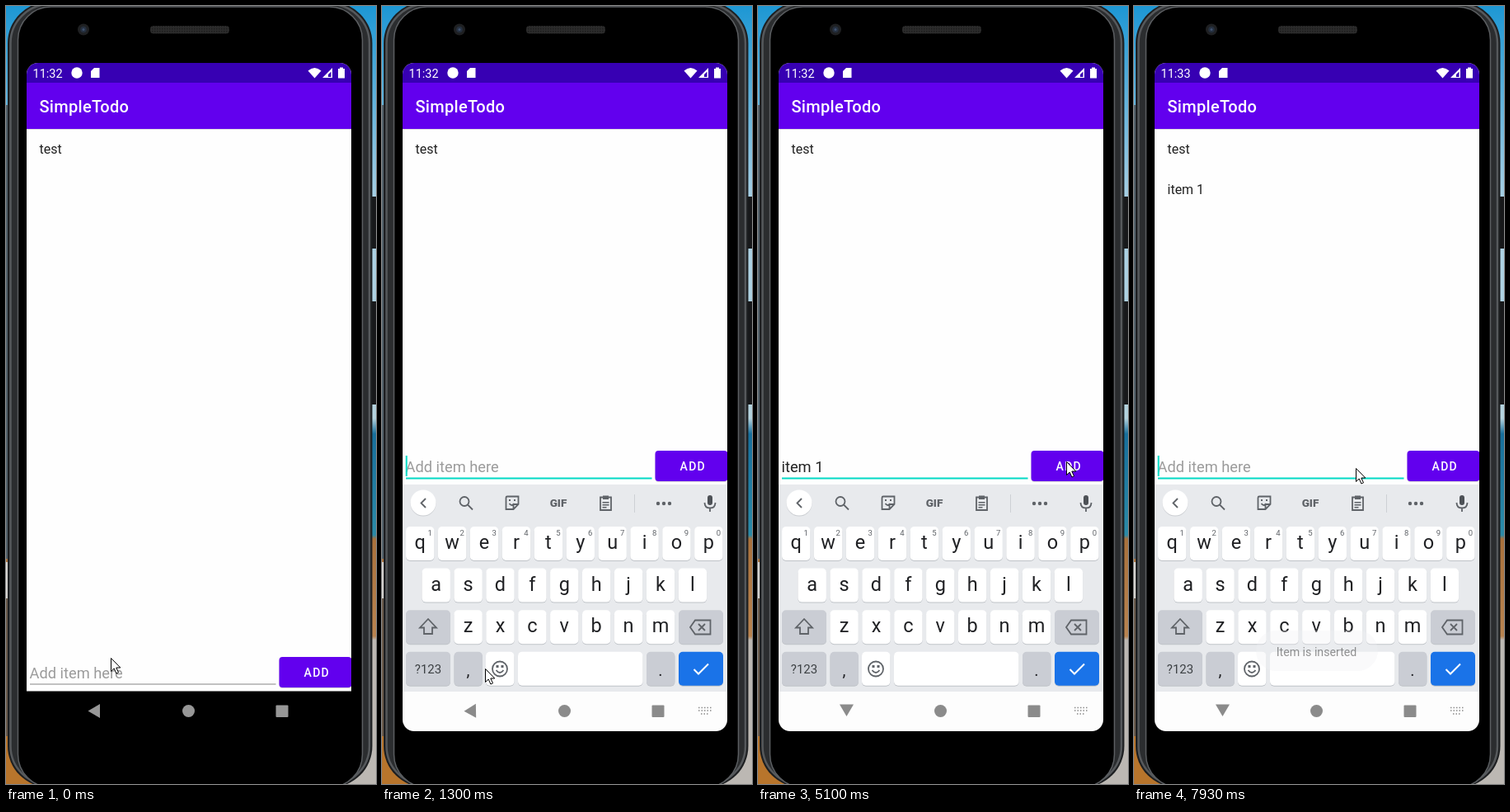
These frames come from a looping animation (449x943 px, 8 s). An HTML page:

```html
<!DOCTYPE html>
<html lang="en">
<head>
<meta charset="utf-8">
<title>Todo app demo</title>
<style>
  html, body { margin: 0; width: 100%; height: 100%; overflow: hidden; background: #000; }
  svg { display: block; width: 100%; height: 100%; font-family: Roboto, sans-serif; }
  .mid { text-anchor: middle; }
  .medium { font-weight: 500; }
  .line { fill: none; stroke: #5f6368; stroke-width: 1.8; }
</style>
</head>
<body>
<svg viewBox="0 0 449 943" preserveAspectRatio="none">
  <defs>
    <linearGradient id="sky" x2="0" y2="1">
      <stop offset="0" stop-color="#1d97d4"/>
      <stop offset=".25" stop-color="#a9d0e4"/>
      <stop offset=".53" stop-color="#b4d3de"/>
      <stop offset=".55" stop-color="#176f9c"/>
      <stop offset=".68" stop-color="#2b8ba8"/>
      <stop offset=".685" stop-color="#a9713c"/>
      <stop offset=".81" stop-color="#b98450"/>
      <stop offset=".815" stop-color="#bcb8b3"/>
    </linearGradient>
    <pattern id="mesh" width="3" height="3" patternUnits="userSpaceOnUse">
      <path d="M0 0h3v3H0z" fill="#2c2c2c"/><path d="M0 0h1.5v1.5H0z" fill="#1b1b1b"/>
    </pattern>
    <clipPath id="screen"><rect x="25" y="69" width="394" height="810" rx="14"/></clipPath>
  </defs>

  <rect width="449" height="943" fill="url(#sky)"/>
  <rect y="120" width="3" height="550" fill="#54636c"/>
  <rect y="674" width="3" height="44" fill="#d5d3d0"/>
  <rect y="718" width="3" height="170" fill="#6b5b4c"/>
  <rect y="885" width="60" height="58" fill="#b8752c"/>

  <g id="phone">
    <path d="M443 231h6v63h-6zM443 358h6v125h-6z" fill="#17181a"/>
    <rect x="2" y="-5" width="442.5" height="952" rx="50" fill="#1d1f21"/>
    <rect x="5.5" y="-2" width="435.5" height="946" rx="47" fill="#2b2d2f" stroke="#56595c" stroke-width="2.5"/>
    <rect x="14.500" y="1" width="418" height="946" rx="40" fill="#000" stroke="#5b5e61" stroke-width="1.5"/>
    <circle cx="94" cy="28.5" r="7" fill="#1f2022"/>
    <circle cx="94" cy="28.5" r="3.800" fill="#26303f"/>
    <circle cx="94" cy="28.5" r="1.5" fill="#3f5270"/>
    <rect x="175" y="24" width="96" height="9.5" rx="4" fill="url(#mesh)"/>
  </g>

  <g clip-path="url(#screen)">
    <rect x="25" y="69" width="394" height="761.5" fill="#fefefe"/>
    <rect x="25" y="149" width="394" height="1" opacity=".12"/>
    <rect x="25" y="93" width="394" height="56" fill="#6200ee"/>
    <rect x="25" y="69" width="394" height="24" fill="#3700b3"/>
    <g fill="#fff">
      <text id="clock" x="32.5" y="86.5" font-size="14.5"></text>
      <circle cx="86" cy="81" r="6.7"/>
      <path d="M107 75h6.5v12H103v-8z"/>
      <path d="M366.5 78.5q8-7 16 0l-8 9z"/>
      <path d="M396 75v12h-12zm-1.5 4.5l-3.5 3.5v3h3.5z" fill-rule="evenodd"/>
      <path d="M405 74.5h4V76h2v11.5h-8V76h2z"/>
      <text class="medium" x="40.5" y="129" font-size="20" letter-spacing=".28">SimpleTodo</text>
    </g>
    <g font-size="16" fill="#212121">
      <text x="40.5" y="179">test</text>
      <text id="item" x="40.5" y="227.5">item 1</text>
    </g>

    <g id="form">
      <g font-size="18.3">
        <text id="hint" x="28.500" y="814.5" fill="#9b9b9b">Add item here</text>
        <text id="entry" x="28.500" y="814.5" fill="#212121" xml:space="preserve"></text>
      </g>
      <rect id="compose" x="29" y="817" height="1" fill="#333"/>
      <rect id="rule" x="29" y="821.5" width="298.5"/>
      <rect id="caret" y="795" width="2" height="25" fill="#03dac5"/>
      <rect x="331.5" y="790" width="88" height="37" rx="4" opacity=".15"/>
      <rect x="331.5" y="789" width="88" height="37" rx="4" fill="#6200ee"/>
      <rect id="ripple" x="331.5" y="789" width="88" height="37" rx="4" fill="#fff"/>
      <text class="medium mid" x="377.3" y="813" font-size="14" letter-spacing="1.25" fill="#fff">ADD</text>
    </g>

    <g id="keyboard">
      <rect x="25" y="580" width="394" height="252" fill="#e8eaed"/>
      <rect x="25" y="831" width="394" height="60" fill="#fdfdfd"/>
      <circle cx="50" cy="603" r="15.5" fill="#c9ccd0"/>
      <circle cx="50" cy="602" r="15.5" fill="#fff"/>
      <path id="chevron" class="line"/>
      <g id="tools">
        <circle class="line" cx="100" cy="600.5" r="5.5"/><path class="line" d="M104 604.5l6 6"/>
        <path class="line" d="M152 594.5h13.5v9.500l-6 6H150.500v-14q0-1.500 1.500-1.500zM165.500 604h-6v6M154.500 603q3 4 6 0"/>
        <path d="M154 598h2v2h-2zM160 598h2v2h-2z" fill="#5f6368"/>
        <text class="mid" x="214" y="607" font-size="13.5" font-weight="900" fill="#5f6368">GIF</text>
        <path class="line" d="M265 595.5h13v15.500h-13z"/>
        <path d="M268 593.5h7v4.500h-7zM267.500 601h8v1.500h-8zM267.500 604h8v1.500h-8zM267.500 607h5v1.500h-5z" fill="#5f6368"/>
        <path d="M306.5 592v22" stroke="#cdd0d4"/>
        <path d="M335 603h15" stroke="#5f6368" stroke-width="4.4" stroke-linecap="round" stroke-dasharray="0 7"/>
      </g>
      <g id="words" class="mid" font-size="18.1" fill="#5f6368">
        <path d="M163.5 591v23M277.5 591v23" stroke="#cdd0d4"/>
        <text x="113" y="609.5"></text><text x="220.5" y="609.5"></text><text x="328" y="609.5"></text>
      </g>
      <rect x="395" y="593" width="6" height="12" rx="3" fill="#4d5156"/>
      <path class="line" d="M391.5 602q0 6.500 6.500 6.500t6.500-6.500M398 608.500v4.500"/>
      <g id="keys"></g>
      <path class="line" d="M56 743l-10 10.500h5V761h10v-7.500h5z"/>
      <path class="line" d="M380 744.5h18.500v17H380l-6-8.500zM384 749l8 8M392 749l-8 8"/>
      <circle class="line" cx="143" cy="803.5" r="9"/>
      <path class="line" d="M138.5 805q4.500 6 9 0"/>
      <path d="M138.5 799h3v3h-3zM144.500 799h3v3h-3z" fill="#5f6368"/>
      <path d="M378.5 804l5.500 5.500 12-12" fill="none" stroke="#fff" stroke-width="2"/>
    </g>

    <g id="nav">
      <path id="back" d="M99.5 854.500l14.500-8.500v17z"/>
      <circle cx="221.5" cy="854.5" r="7.5"/>
      <rect x="327.5" y="847.5" width="15" height="14.500" rx="1"/>
      <path id="dots" d="M384 850.5h16M384 854h16M387 858h10" fill="none" stroke-width="1.500" stroke-dasharray="1.5 2"/>
    </g>

    <g id="toast">
      <rect id="bubble" x="148" y="757" width="148" height="49" rx="24.5" fill="#eeeff0"/>
      <text id="message" class="mid" x="221.5" y="787.5" font-size="14.2" fill="#3c3c3c">Item is inserted</text>
    </g>
  </g>
  <path id="pointer" d="M.5 .5v16l3.700-3.500 2.700 6 2.600-1.200-2.700-5.800h5z" fill="#fff" stroke="#000"/>
</svg>

<script>
const $ = id => document.getElementById(id);
const LOOP = 8000, REFRESH = 135.5;
const TYPE_AT = 2060, TYPE_GAP = 272, CLEAR_AT = 5600;
const FOCUS_AT = 650, RESIZE_AT = 800, SLIDE_AT = 850, OPEN_AT = 1250;
const BLINK = 510;
const ENTRY = 'item 1';
const SUGGEST = ['', "i,I,I'm", "it,it's,its", 'ite,item,items', 'item,items,itemized', 'item,items,itemized', ''];

const clamp = (v, lo = 0, hi = 1) => Math.min(hi, Math.max(lo, v));
const ramp = (t, from, to) => clamp((t - from) / (to - from));
const smooth = p => p * p * (3 - 2 * p);

const set = (id, attrs) => { for (const k in attrs) $(id).setAttribute(k, attrs[k]); };
const show = (id, on) => set(id, { visibility: on ? 'visible' : 'hidden' });
const move = (id, x, y) => set(id, { transform: `translate(${x} ${y})` });

function key(x, y, w, fill = '#fff') {
  const box = (dy, c) => `<rect x="${x}" y="${y + dy}" width="${w}" height="41" rx="5" fill="${c}"/>`;
  return box(1, '#bfc3c8') + box(0, fill);
}
const label = (x, y, size, s, fill = '#202124') =>
  `<text class="mid" x="${x}" y="${y}" font-size="${size}" fill="${fill}">${s}</text>`;

function buildKeys() {
  const PITCH = 38.9, ROW = 50.6, TOP = 631, W = 34.4, grey = '#cacdd4';
  const y3 = TOP + 2 * ROW, y4 = TOP + 3 * ROW;
  let out = '';
  ['qwertyuiop', 'asdfghjkl', 'zxcvbnm'].forEach((row, r) => {
    const y = TOP + r * ROW;
    [...row].forEach((ch, i) => {
      const x = 221.3 + (i - (row.length - 1) / 2) * PITCH;
      out += key(x - W / 2, y, W) + label(x, y + 27, 23.5, ch);
      if (r === 0) out += label(x + 12, y + 10.5, 9.5, (i + 1) % 10, '#5f6368');
    });
  });
  for (const y of [y3, y4]) out += key(29, y, 54, grey) + key(360, y, 54, y === y3 ? grey : '#1a73e8');
  out += key(87.5, y4, W, grey) + key(126, y4, W) + key(165, y4, 151.5) + key(321, y4, W, grey);
  out += label(56, 809, 15, '?123', '#3c4043') + label(104.5, 812, 20, ',') + label(338, 812, 20, '.');
  $('keys').innerHTML = out;
}

// Pointer glides: start, end, target x, target y
const glides = [[280, 560, 125, 803], [3960, 5040, 374, 552], [5950, 6400, 269, 560]];
function pointerAt(t) {
  let x = 127, y = 790;
  for (const [from, to, tx, ty] of glides) {
    const p = smooth(ramp(t, from, to));
    x += (tx - x) * p;
    y += (ty - y) * p;
  }
  return [x, y];
}

const typedCount = t => clamp(Math.floor((t - TYPE_AT) / TYPE_GAP) + 1, 0, ENTRY.length);

// The blink restarts whenever the text changes
function caretOn(t) {
  const n = typedCount(t);
  const reset = t >= CLEAR_AT ? CLEAR_AT : n ? TYPE_AT + (n - 1) * TYPE_GAP : 950;
  return t >= FOCUS_AT && Math.floor(Math.max(0, t - reset) / BLINK) % 2 === 0;
}

function renderForm(t) {
  const n = typedCount(t), text = t < CLEAR_AT ? ENTRY.slice(0, n) : '';
  const focused = t >= FOCUS_AT;
  move('form', 0, t < RESIZE_AT ? 0 : -250);
  $('entry').textContent = text;
  show('hint', !text);
  set('rule', focused ? { height: 2, fill: '#03dac5' } : { height: 1, fill: '#858585' });
  const width = text ? $('entry').getComputedTextLength() : 0;
  set('caret', { x: 28.7 + width });
  show('caret', caretOn(t));
  set('compose', { width: Math.max(0, (n === 2 ? width / 2 : width) - 1) });
  show('compose', n > 0 && n < 5);
  set('ripple', { opacity: .2 * Math.sin(Math.PI * ramp(t, 5200, 5850)) });
}

function renderKeyboard(t) {
  const words = SUGGEST[typedCount(t - REFRESH)], up = t >= SLIDE_AT;
  move('keyboard', 0, 250 * (1 - ramp(t, SLIDE_AT, OPEN_AT)) ** 2.3);
  show('keyboard', up);
  show('tools', up && !words);
  show('words', words);
  const slots = $('words').querySelectorAll('text');
  words.split(',').forEach((w, i) => { slots[i].textContent = w; });
  set('chevron', { d: words ? 'M47 597l5.5 5.5-5.5 5.5' : 'M53 597l-5.5 5.5 5.5 5.5' });

  const ink = !up ? '#979797' : t < OPEN_AT ? '#d6d7d9' : '#8b8b8b';
  set('nav', { fill: ink });
  set('dots', { stroke: ink });
  show('dots', up);
  set('back', { transform: `rotate(${-90 * ramp(t, OPEN_AT, 1650)} 106.75 853.75)` });
}

function render(time) {
  const t = Math.max(0, 35 + REFRESH * Math.floor((time - 35) / REFRESH));
  renderForm(t);
  renderKeyboard(t);
  $('clock').textContent = t < 5980 ? '11:32' : '11:33';
  set('item', { opacity: ramp(t, 5840, 6150) });
  const fade = ramp(t, 5750, 6020) - ramp(t, 7650, 8190);
  set('message', { opacity: fade });
  set('bubble', { opacity: fade * fade });
  move('pointer', ...pointerAt(t));
}

buildKeys();
const start = performance.now();
function loop() {
  render((performance.now() - start) % LOOP);
  requestAnimationFrame(loop);
}
loop();
</script>
</body>
</html>
```
